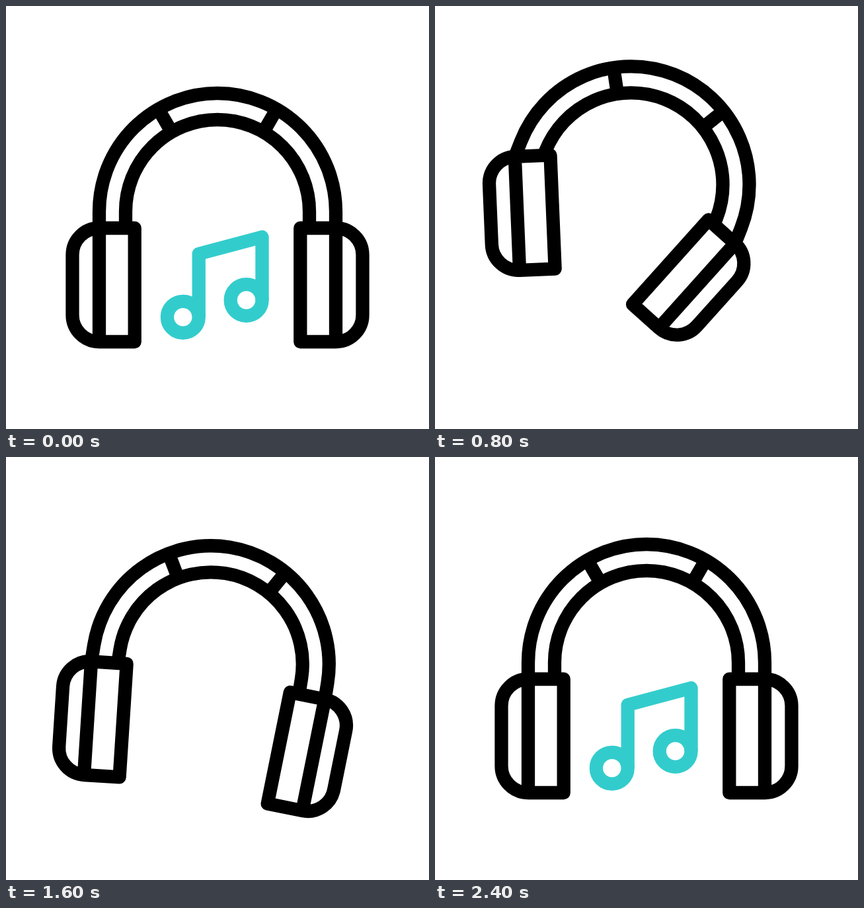
Animation of 640 by 640 pixels, one loop 2840 ms. Source, as an HTML page:

```html
<!DOCTYPE html>
<html lang="en">
<head>
<meta charset="utf-8">
<title>Headphones</title>
<style>
  html, body { margin: 0; height: 100%; overflow: hidden; background: #fff; }
  svg { display: block; width: 100vw; height: 100vh; }
</style>
</head>
<body>
<svg viewBox="0 0 640 640" fill="none" stroke="#000" stroke-width="20.3" stroke-linejoin="round">
  <defs>
    <path id="cup" fill="#fff" d="M141 336H194.7V508H141ZA40.5 40.5 0 0 0 100.5 376.5V467.5A40.5 40.5 0 0 0 141 508"/>
  </defs>
  <g id="phones">
    <path d="M141 336V311A179 179 0 0 1 499 311V336M181 336V311A139 139 0 0 1 459 311V336"/>
    <path d="M320 172V132" transform="rotate(-30 320 311)"/>
    <path d="M320 172V132" transform="rotate(30 320 311)"/>
    <use id="left" href="#cup"/>
    <g transform="matrix(-1 0 0 1 640 0)"><use id="right" href="#cup"/></g>
  </g>
  <g id="note" stroke="#33cccc">
    <path d="M291.7 470.5V375L387.5 349.5V445"/>
    <circle cx="267.8" cy="470.7" r="23.9"/>
    <circle cx="363.6" cy="445" r="23.9"/>
  </g>
</svg>
<script>
const LOOP = 2840;

// Tracks are [time, value] keys joined by an ease in and out
const tilt = [[0, 0], [680, 29], [1160, -18.9], [1600, 9.2], [2040, -3.8], [2400, 0]];
const lift = [[0, 0], [680, -52], [1160, 49], [1680, 0]];
const leftTurn = [[120, 0], [800, -23.9], [1200, -0.7], [1800, -7.2], [2280, 0]];
const rightTurn = [[120, 0], [800, 20.4], [1200, -5.9], [1800, 5.1], [2280, 0]];
const noteRise = [[0, 0], [680, -244], [1680, -244], [1680, 106], [2400, 0]];
const noteAlpha = [[400, 1], [640, 0], [1680, 0], [1920, 1]];

function valueAt(keys, t) {
  const next = keys.findIndex(([time]) => time > t);
  if (next < 0) return keys[keys.length - 1][1];
  if (next === 0) return keys[0][1];
  const [t0, a] = keys[next - 1], [t1, b] = keys[next];
  const p = (t - t0) / (t1 - t0);
  return a + (b - a) * p * p * (3 - 2 * p);
}

const [phones, left, right, note] =
  ["phones", "left", "right", "note"].map(id => document.getElementById(id));

function draw() {
  // The picture advances in steps of 40 ms
  const t = Math.floor(performance.now() % LOOP / 40) * 40;
  const at = keys => valueAt(keys, t);
  const set = (part, value) => part.setAttribute("transform", value);
  set(phones, `translate(0 ${at(lift)}) rotate(${at(tilt)} 320 247)`);
  set(left, `rotate(${at(leftTurn)} 141 336)`);
  set(right, `rotate(${-at(rightTurn)} 141 336)`);
  set(note, `translate(0 ${at(noteRise)})`);
  note.setAttribute("opacity", at(noteAlpha));
  requestAnimationFrame(draw);
}
draw();
</script>
</body>
</html>
```
